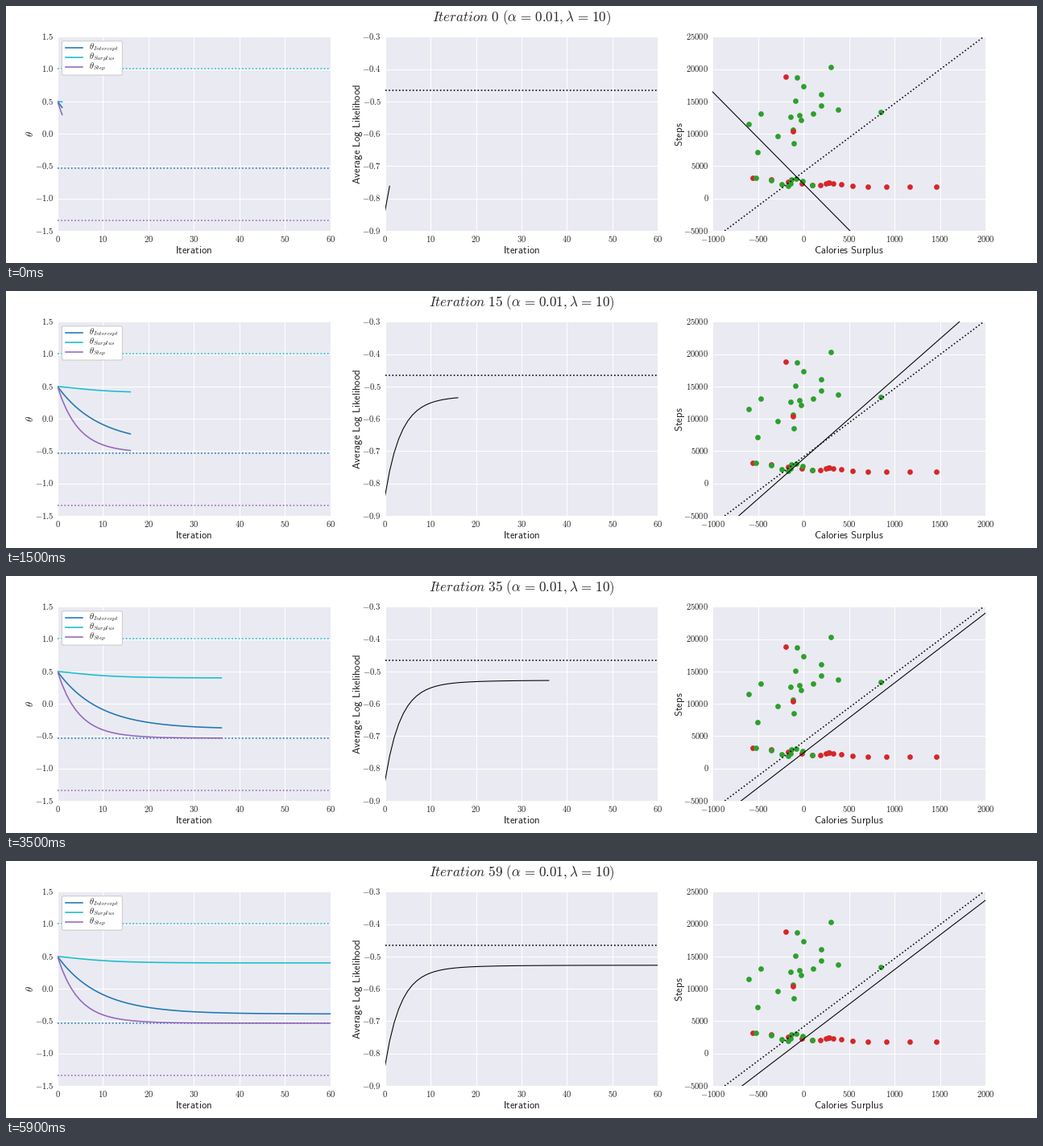
Write a matplotlib script that moves like this. It is 1280 px wide and 320 px high and loops after 6000 ms.

```python
import numpy as np
import matplotlib.pyplot as plt
from matplotlib.animation import FuncAnimation
from matplotlib.patches import FancyBboxPatch

W, H = 1280, 320
STEPS = 60
INK = "0.15"
BLUE, CYAN, PURPLE = "tab:blue", "tab:cyan", "tab:purple"
TICK, LABEL, TITLE = 9.6, 11.55, 15.36
THICK, THIN = 1.44, 0.96

plt.rcParams["mathtext.fontset"] = "cm"


def spread(n, mid, reach, skew):
    """n sorted values, dense around mid and sparse at the ends."""
    t = np.linspace(-1, 1, n)
    return mid + reach * t * abs(t) + skew * t**2


def relax(final, *terms):
    """Sum of (amplitude, rate) decays towards a final value."""
    n = np.arange(STEPS + 1)
    return final + sum(a * np.exp(-r * n) for a, r in terms)


# Gradient ascent converging to the penalised optimum
intercept = relax(-0.388, (0.888, 0.109))
surplus = relax(0.401, (0.156, 0.14), (-0.057, 0.3))
step = relax(-0.531, (0.92, 0.23), (0.11, 0.112))
loglik = relax(-0.527, (-0.285, 0.3), (-0.026, 0.1))

# Standardisation of calories surplus and steps
mean_cal, std_cal = 66.5, 419
mean_steps, std_steps = 7290, 5948

# Active days by falling step count, then the two low-step bands
active_cal = [302, -70, 1, 196, -92, 191, 382, 847, -468,
              103, -43, -141, -30, -606, -114, -287, -105, -508]
active_steps = spread(len(active_cal), 13100, -6575, 700)
i, j = np.arange(9), np.arange(16)
green_cal = spread(len(i), -145, 310, -67)
green_steps = 2550 + 600 * np.cos(1.1 * i)
red_cal = spread(len(j), 280, 1010, 170)
red_steps = 2700 - 60 * j + 500 * np.cos(0.75 * j) * (1 - j / 15)

fig = plt.figure(figsize=(W / 80, H / 80), dpi=80, facecolor="white")
axes = fig.subplots(1, 3, gridspec_kw=dict(
    left=0.05, right=0.95, bottom=0.125, top=0.88, wspace=0.2))

# Pixel-coordinate layer for all lettering
page = fig.add_axes([0, 0, 1, 1])
page.set(xlim=(0, W), ylim=(H, 0))
page.axis("off")


def write(x, y, text, size, **kw):
    style = dict(ha="center", va="baseline", color=INK,
                 rotation_mode="anchor") | kw
    return page.text(x, y, f"${text}$", fontsize=size, **style)


def sans(text):
    return r"\mathsf{" + text.replace(" ", r"\ ") + "}"


def panel(ax, xticks, yticks, yfmt, xlabel, ylabel, ylabel_x):
    box = ax.get_position()
    left, right = box.x0 * W, box.x1 * W
    top, bottom = (1 - box.y1) * H, (1 - box.y0) * H
    ax.set(xlim=(xticks[0], xticks[-1]), ylim=(yticks[0], yticks[-1]),
           xticks=xticks, yticks=yticks, facecolor="#EAEAF2")
    ax.set_axisbelow(True)
    ax.grid(color="white", linewidth=THIN)
    ax.tick_params(length=0, labelbottom=False, labelleft=False)
    ax.spines[:].set_visible(False)
    for px, v in zip(np.linspace(left, right, len(xticks)), xticks):
        write(px, 293.6, f"{v:d}", TICK)
    for py, v in zip(np.linspace(bottom, top, len(yticks)), yticks):
        write(left - 4.7, py + 3.6, format(v, yfmt), TICK, ha="right")
    write((left + right) / 2, 308.4, sans(xlabel), LABEL)
    write(ylabel_x, (top + bottom) / 2, ylabel, LABEL, rotation=90)


ax_theta, ax_ll, ax_data = axes
iters = range(0, STEPS + 1, 10)
panel(ax_theta, iters, np.arange(-3, 4) / 2, ".1f", "Iteration", r"\theta", 34)
panel(ax_ll, iters, np.arange(-9, -2) / 10, ".1f", "Iteration",
      sans("Average Log Likelihood"), 440)
panel(ax_data, range(-1000, 2001, 500), range(-5000, 25001, 5000), "d",
      "Calories Surplus", sans("Steps"), 840)

# Unpenalised optimum as dotted references
dots = dict(linestyle=":", linewidth=THICK)
for best, color in zip((-0.537, 1.006, -1.343), (BLUE, CYAN, PURPLE)):
    ax_theta.plot([0, STEPS], [best, best], color=color, **dots)
ax_ll.plot([0, STEPS], [-0.465, -0.465], color="black", **dots)
ax_data.plot([-867, 1980], [-5000, 25000], color="black", **dots)

for cal, steps, color in (
        (active_cal, active_steps, "tab:green"),
        (red_cal, red_steps, "tab:red"),
        (green_cal, green_steps, "tab:green"),
        ([-194, -119], [18900, 10390], "tab:red")):
    ax_data.scatter(cal, steps, s=37, linewidths=0, color=color)

thetas = (intercept, surplus, step)
curves = [ax_theta.plot([], [], color=c, linewidth=THICK)[0]
          for c in (BLUE, CYAN, PURPLE)]
curves += ax_ll.plot([], [], color="black", linewidth=THIN)
boundary, = ax_data.plot([], [], color="black", linewidth=THIN)

# Legend
page.add_patch(FancyBboxPatch(
    (69.4, 43.7), 75, 42.3, boxstyle="round,pad=0,rounding_size=2",
    facecolor="white", edgecolor="0.8", linewidth=THIN))
rows = zip(("Intercept", "Surplus", "Step"), (BLUE, CYAN, PURPLE))
for k, (name, color) in enumerate(rows):
    row = 51.5 + 12 * k
    page.plot([74, 95.3], [row, row], color=color, linewidth=THICK)
    write(103, row + 3, r"\theta_{%s}" % name, TICK, ha="left")

title = write(W / 2, 19.3, "0", TITLE)
EQ = r"\hspace{0.116}=\hspace{0.116}"
edge = np.array([-1000, 2000])


def update(k):
    n = k + 2
    for curve, values in zip(curves, (*thetas, loglik)):
        curve.set_data(np.arange(n), values[:n])
    b, w_cal, w_steps = (theta[k] for theta in thetas)
    z = -(b + w_cal * (edge - mean_cal) / std_cal) / w_steps
    boundary.set_data(edge, mean_steps + std_steps * z)
    title.set_text(rf"$Iteration\ {k}\ (\alpha{EQ}0.01, \lambda{EQ}10)$")
    return [*curves, boundary, title]


anim = FuncAnimation(fig, update, frames=STEPS, interval=100, repeat=True,
                     repeat_delay=0, blit=False)
plt.show()
```
